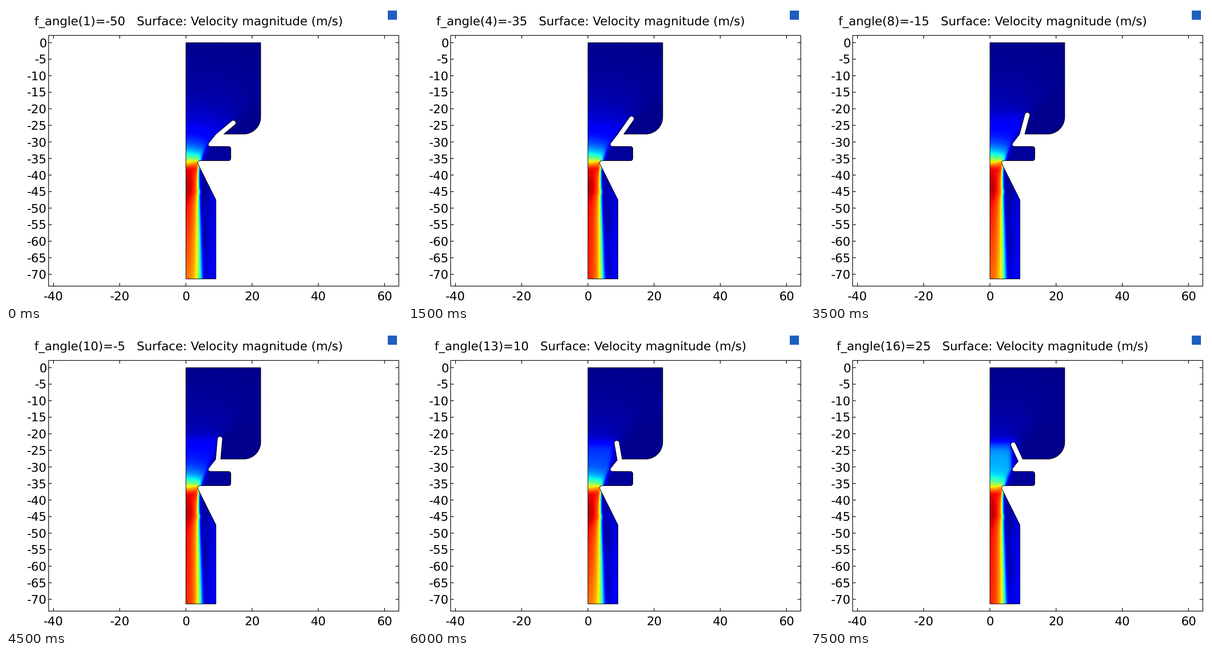
Write a matplotlib script that moves like this. It is 864 by 648 pixels and loops after 8000 ms.

```python
import numpy as np
import matplotlib.pyplot as plt
from matplotlib.animation import FuncAnimation
from matplotlib.patches import Polygon, Rectangle

plt.rcParams["text.hinting"] = "none"

W, H, DPI = 864, 648, 100
STEPS, INTERVAL = 16, 500
PX = 72 / DPI             # points per pixel
X0, Y0, UNIT = 392.5, 79.9, 7.222
TOP, FLOOR, LIP, END = 80, 279.5, 340, 595.5
HALF = 5.5                # half width of the flap
FONT = dict(family="DejaVu Sans", size=19, color="black")

gx, gy = np.meshgrid(np.arange(392, 558) + 0.5, np.arange(79, 598) + 0.5)
x = gx - X0


def sigmoid(t):
    return 0.5 + 0.5 * np.tanh(t / 2)


def arc(cx, cy, r, a0, a1, n=14):
    t = np.radians(np.linspace(a0, a1, n))
    return list(zip(cx + r * np.cos(t), cy + r * np.sin(t)))


def flap_tip(deg):
    a = np.radians(deg)
    if deg > 0:
        pivot, length = np.array([463.8, 291.7]), 48
    else:
        pivot, length = np.array([463.0, 277.8 - 0.097 * deg]), 43
    return pivot - length * np.array([np.sin(a), np.cos(a)])


def outline(deg):
    a = np.radians(deg)
    tip = flap_tip(deg)
    down = np.array([np.sin(a), np.cos(a)])
    side = np.array([np.cos(a), -np.sin(a)])
    right, left = tip + HALF * side, tip - HALF * side
    base_r = right + down * (FLOOR - right[1]) / down[1]
    base_l = left + down * (280 + 0.16 * max(deg, 0) - left[1]) / down[1]
    cap = [tip + HALF * (side * np.cos(t) - down * np.sin(t))
           for t in np.linspace(0, np.pi, 14)]
    pts = [(X0, TOP), (555.8, TOP)]
    pts += arc(518.5, 242.2, 37.3, 0, 90)
    pts += [base_r, *cap, base_l]
    pts += arc(445.6, 302, 4.3, 220, 90, 8)
    pts += arc(485.5, 311.5, 5, -90, 0, 7) + arc(485.5, 332.5, 5, 0, 90, 7)
    pts += arc(423, 342.3, 4.8, 270, 155, 8)
    pts += [(458, 423), (458, END), (X0, END)]
    return pts


def axis_speed(y, tail):
    """Speed on the axis: sink-like rise, short peak, slow decay."""
    rise = 0.9 / (1 + (np.clip(358 - y, 0, None) / 30) ** 1.8)
    peak = 0.055 * np.exp(-((y - 395) / 28) ** 2)
    fade = np.clip((y - 410) / (END - 410), 0, 1)
    return rise + peak - (0.9 - tail) * fade


def inflow(deg, tail):
    tx, ty = flap_tip(deg)
    bend = 0.5 * np.clip((LIP - gy) / 45, 0, 1)
    reach = LIP - np.sqrt((gy - LIP) ** 2 + bend * x ** 2)
    sink = axis_speed(reach, tail)
    sink *= 1 + 0.2 * (x / 26) ** 2 * np.exp(np.minimum(gy - LIP, 0) / 4)

    # the flap narrows the channel, so the same flux runs faster
    gate = 610 / (tx - HALF - X0) ** 2 * sigmoid((gy - ty + 5) / 9)
    main = (sink ** 4 + gate ** 4) ** 0.25

    # slow water beyond the line from flap tip to nose to lip
    edge = np.interp(gy, [TOP, ty, 302, 338],
                     [tx + 0.9 * (ty - TOP), tx - 4, 440, 424])
    blur = 2.5 + 0.45 * np.clip(ty - gy, 0, None)
    pocket = 0.04 * sigmoid((462 - gx) / 4) * sigmoid((gy - 240) / 6)
    slow = np.where(gy > 304, 0.025, 0.012 + pocket)
    return slow + (main - slow) * sigmoid((edge - gx) / blur)


def jet(i, tail):
    """Core below the lip that spreads into a slow wake."""
    t = np.clip((gy - LIP) / (END - LIP), 0, 1)
    radius = 26.5 + 7.5 * t + 1.2 * np.exp(-((gy - 405) / 6) ** 2)
    radius += 4 * np.exp(-20 * t)
    droop = 0.3 - 0.5 * np.exp(-10 * t)
    core = axis_speed(gy, tail) * (1 - droop * (x / radius) ** 2)
    wake = 0.03 + 0.07 * (0.5 + t) * sigmoid((x - 50) / 4)
    wake += 0.012 * np.sin(gy / 17 + 0.8 * i) * np.exp(-((x - 45) / 7) ** 2)
    return wake + (core - wake) * sigmoid((radius - x) / (1.5 + 2.5 * t))


def speed(i, deg):
    tail = 0.825 + 0.04 * np.cos(np.pi * (i - 3) / 3)
    return np.where(gy < LIP, inflow(deg, tail), jet(i, tail))


fig = plt.figure(figsize=(W / DPI, H / DPI), dpi=DPI, facecolor="white")
ax = fig.add_axes([0, 0, 1, 1])
ax.axis("off")

img = ax.imshow(speed(0, -50), cmap="jet", vmin=0, vmax=1, aspect="auto",
                extent=(392, 558, 598, 79), interpolation="bilinear")
body = Polygon(outline(-50), closed=True, fill=False, ec="black", lw=1.1 * PX)
ax.add_patch(body)
ax.set_xlim(0, W)
ax.set_ylim(H, 0)

L, R, T, B = 93, 857, 64.3, 611.2
LINE = dict(color="black", lw=1.4 * PX, solid_capstyle="butt", snap=False)
ax.add_patch(Rectangle((L, T), R - L, B - T, fill=False, ec="black",
                       lw=1.4 * PX, snap=False))
for u in range(-40, 61, 20):
    tx = X0 + UNIT * u
    ax.plot([tx, tx], [T, T + 7], **LINE)
    ax.plot([tx, tx], [B, B - 7], **LINE)
    ax.text(tx - 0.3, 642, str(u), ha="center", va="baseline", **FONT)
for u in range(0, -71, -5):
    ty = Y0 - UNIT * u
    ax.plot([L, L + 7], [ty, ty], **LINE)
    ax.plot([R, R - 7], [ty, ty], **LINE)
    ax.text(88.9, ty + 9.6, str(u), ha="right", va="baseline", **FONT)

ax.add_patch(Rectangle((833, 10), 20, 20, color="#1d5fc0", lw=0))
title = ax.text(398.5, 42, "", ha="center", va="baseline", **FONT)


def update(i):
    deg = -50 + 5 * i
    title.set_text(
        f"f_angle({i + 1})={deg}   Surface: Velocity magnitude (m/s)")
    body.set_xy(outline(deg))
    img.set_data(speed(i, deg))
    img.set_clip_path(body)
    return title, body, img


anim = FuncAnimation(fig, update, frames=STEPS, interval=INTERVAL,
                     repeat=True, repeat_delay=0)
plt.show()
```
